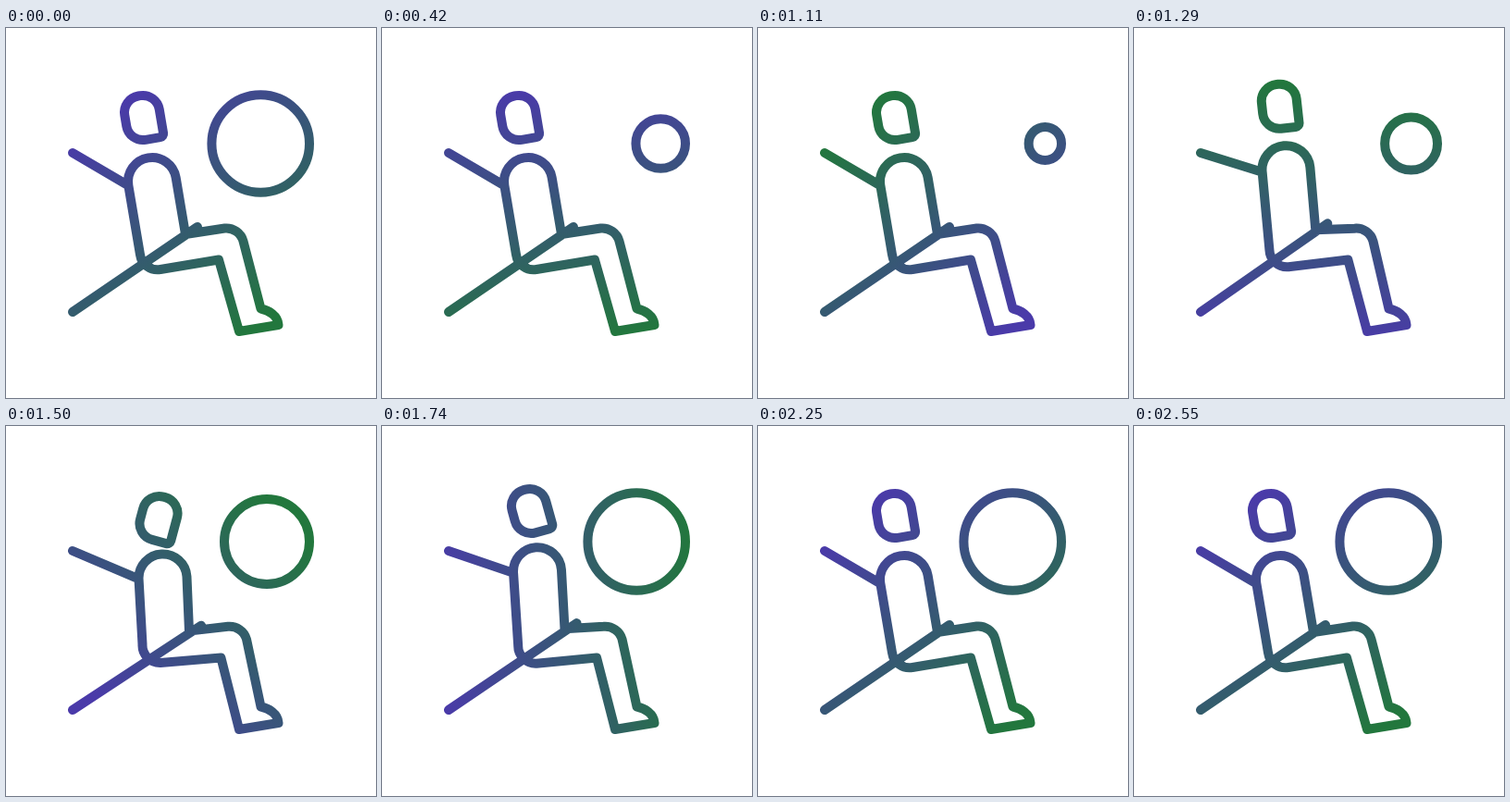
An HTML page for the animation above (4580 ms loop, 400 px wide and 400 px high).

```html
<!DOCTYPE html>
<html lang="en">
<head>
<meta charset="utf-8">
<title>Seated ball player</title>
<style>
  html, body { margin: 0; width: 100%; height: 100%; overflow: hidden; background: #fff; }
  svg { display: block; width: 100%; height: 100%; }
</style>
</head>
<body>
<svg viewBox="0 0 400 400">
  <defs>
    <linearGradient id="ink" gradientUnits="userSpaceOnUse">
      <stop offset="0" stop-color="#4a3aa9"/>
      <stop offset="1" stop-color="#22773d"/>
    </linearGradient>
  </defs>
  <path id="art" fill="none" stroke="url(#ink)" stroke-width="10"
        stroke-linecap="round" stroke-linejoin="round"/>
</svg>
<script>
const LOOP = 4580, END = 2550, STEP = 30;
const ink = document.getElementById('ink');
const art = document.getElementById('art');

const rad = deg => deg * Math.PI / 180;
const clamp = v => Math.min(1, Math.max(0, v));
const mix = (a, b, k) => a + (b - a) * k;
const smooth = k => k * k * (3 - 2 * k);
const pt = (x, y) => x.toFixed(2) + ' ' + y.toFixed(2);

// time, torso swing, lift, head x, head y, head tilt
const poses = [
  [1110, 0, 0, 148, 97, -9.6],
  [1320, 0.6, 13, 158, 84, -6],
  [1500, 1, 1, 165, 100, 15],
  [1740, 0.87, 8, 160.5, 92, -15.5],
  [1980, 0, -3, 145, 101, -8],
  [2220, 0, 0, 148, 97, -9.6]
];

function poseAt(t) {
  const next = poses.findIndex(p => p[0] > t);
  if (next === 0) return poses[0];
  if (next < 0) return poses[poses.length - 1];
  const a = poses[next - 1], b = poses[next];
  const k = smooth((t - a[0]) / (b[0] - a[0]));
  return a.map((v, i) => mix(v, b[i], k));
}

function placer(x, y, deg) {
  const c = Math.cos(rad(deg)), s = Math.sin(rad(deg));
  return (u, v) => pt(x + u * c - v * s, y + u * s + v * c);
}

function ball(t) {
  const away = smooth(clamp(t / 640)) - smooth(clamp((t - 1060) / 610));
  const r = mix(52.8, 17, away);
  const arc = x => `A${r} ${r} 0 1 1 ${pt(x, 125)}`;
  return `M${pt(328, 125)}${arc(328 - 2 * r)}${arc(328)}Z`;
}

function head(x, y, tilt) {
  const p = placer(x, y, tilt);
  return `M${p(19, 20)}L${p(19, -6)}A18 18 0 0 0 ${p(1, -24)}L${p(-1, -24)}` +
    `A18 18 0 0 0 ${p(-19, -6)}L${p(-19, 6)}A18 18 0 0 0 ${p(-1, 24)}` +
    `L${p(15, 24)}A4 4 0 0 0 ${p(19, 20)}Z`;
}

function body(swing, lift) {
  const at = placer(158 + 11.5 * swing, 166 - swing - lift, -9.6 + 6.6 * swing);
  const left = at(-26, 0), right = at(26, 0);
  const hipX = 194 + 4 * swing, hipY = 223 - swing - 0.35 * lift;
  const arms = `M72 135L${left}M72 307L${pt(hipX + 13, hipY - 8 + 2 * swing)}`;
  const knee = pt(230 + 2.4 * swing, 250.5);
  return arms +
    `M${left}A26 26 0 0 1 ${right}L${pt(hipX, hipY)}` +
    `L${pt(236.5 + 3.5 * swing, 216.5 + 0.3 * swing)}` +
    `A19 19 0 0 1 ${pt(256.5 + 3.5 * swing, 230.5)}` +
    `L275.5 303.5C284 305 294 311 294.5 321L252 328L${knee}` +
    `L${pt(167, 261 - 5 * swing)}A19 19 0 0 1 ${pt(145 + 2.5 * swing, 245 - 9 * swing)}Z`;
}

function turn(t) {
  const k = t / END, peak = 0.385;
  const done = k < peak ? k * k / peak : 1 - (1 - k) ** 2 / (1 - peak);
  const a = rad(55 + 360 * done), dx = 140 * Math.cos(a), dy = 140 * Math.sin(a);
  const ends = { x1: 200 - dx, y1: 200 - dy, x2: 200 + dx, y2: 200 + dy };
  for (const key in ends) ink.setAttribute(key, ends[key].toFixed(2));
}

function draw(ms) {
  const t = Math.min(END, Math.floor((ms % LOOP) / STEP) * STEP);
  const [, swing, lift, x, y, tilt] = poseAt(t);
  turn(t);
  art.setAttribute('d', ball(t) + head(x, y, tilt) + body(swing, lift));
}

const start = performance.now();
function tick() {
  draw(performance.now() - start);
  requestAnimationFrame(tick);
}
tick();
</script>
</body>
</html>
```
